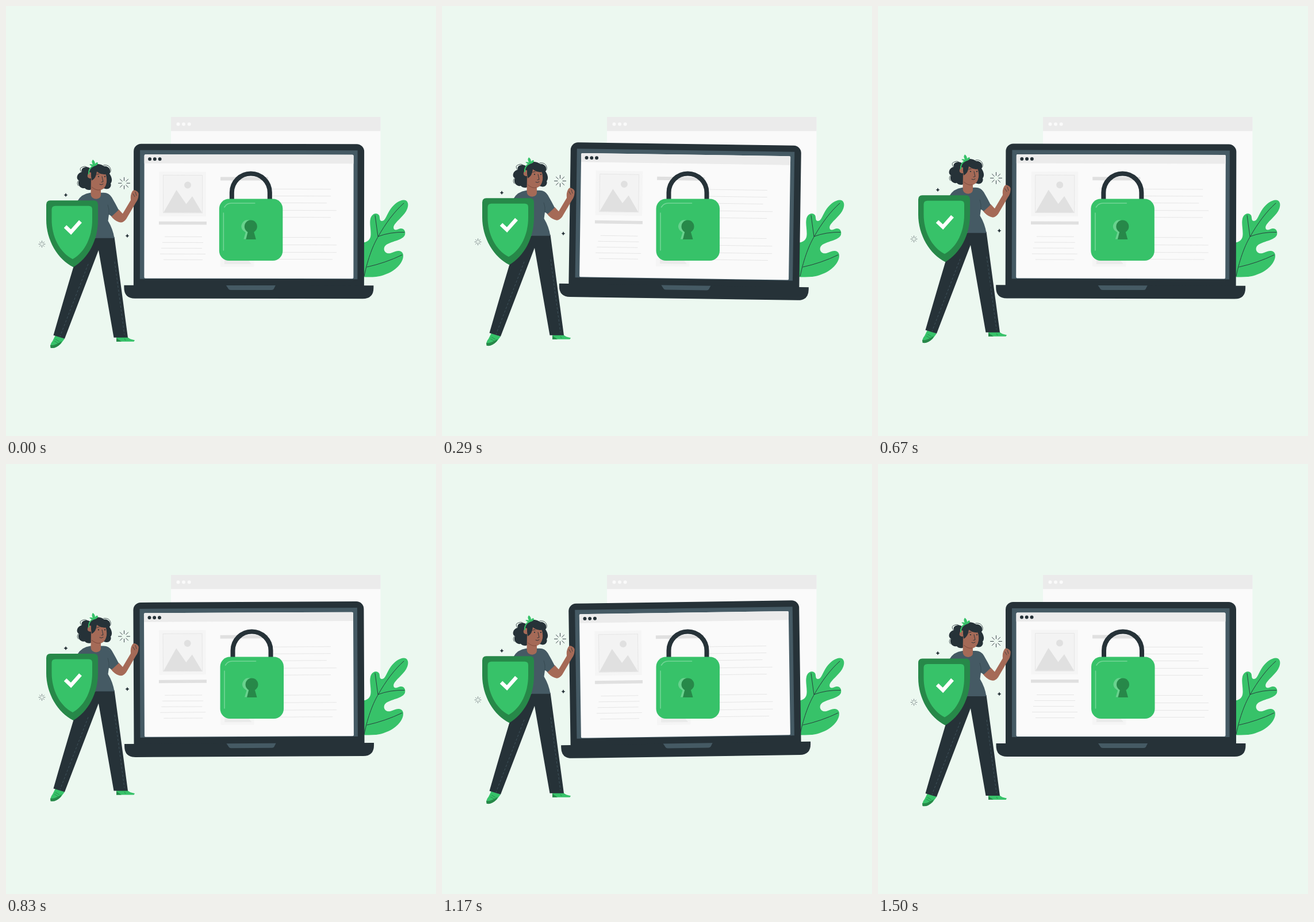
Write an HTML page that moves like this. It is 748 px wide and 748 px high and loops after 1.54 s.

```html
<!DOCTYPE html>
<html lang="en">
<head>
<meta charset="utf-8">
<title>Secure laptop</title>
<style>
  html, body { margin: 0; height: 100%; overflow: hidden; background: #ecf8f0; }
  svg { display: block; width: 100%; height: 100%; }
  .ink { fill: #263238; }
  .slate { fill: #455a64; }
  .green { fill: #37c269; }
  .deep { fill: #278849; }
  .skin { fill: #a56a57; }
  .paper { fill: #fafafa; }
  .mist { fill: #f5f5f5; }
  .pale { fill: #ebebeb; }
  .grey { fill: #e0e0e0; }
  .line { fill: none; stroke: #263238; stroke-linecap: round; }
  .rule { fill: none; stroke: #e6e6e6; stroke-width: 1; }
  .shine { fill: none; stroke: #73d596; stroke-width: 1.6; stroke-linecap: round; }
</style>
</head>
<body>
<svg viewBox="0 0 748 748">
  <g id="window">
    <path class="paper" d="M287 193H651.5V411H287z"/>
    <path class="pale" d="M287 193H651.5V217.5H287z"/>
    <g class="paper"><circle cx="299.5" cy="205.5" r="3"/><circle cx="309" cy="205.5" r="3"/><circle cx="318.7" cy="205.5" r="3"/></g>
  </g>

  <g id="leaf">
    <path class="green" d="M618 471V412C629 411 634 407 634.500 398C635 388 632 378 634 370C636 361 645 358 649 364C651 368 649 374 654 374C660 374 662 363 669 353C677 342 689 335 696 338.500C701 342 700 350 696 357C690 367 677 376 674.500 383C673 389 677 391 683 388C690 385 696 390 694 398C691 407 672 409 662 415C656 419 656 427 663 430C670 432 676 425 684 426C692 427 693 436 688 445C680 460 660 469 644 471Q632 472 618 471z"/>
    <path class="line" stroke-width=".9" d="M623 470C630 437 639 415 648 400C660 379 675 358 692 343M642 364L647 401Q668 393 693 393.500M628 454Q660 447 689 433"/>
  </g>

  <g id="laptop">
    <rect class="ink" x="222" y="240" width="401" height="260" rx="13"/>
    <path class="slate" d="M233 251H611.500V475H233z"/>
    <rect class="paper" x="240.500" y="258.500" width="364" height="215.500" rx="2"/>
    <path class="pale" d="M240.500 274V260.500q0-2 2-2H602.500q2 0 2 2V274z"/>
    <g class="ink"><circle cx="250" cy="266.500" r="3"/><circle cx="258.700" cy="266.500" r="3"/><circle cx="267.500" cy="266.500" r="3"/></g>
    <path class="ink" d="M205.500 486H639.500V490q0 19-19 19H224.500q-19 0-19-19z"/>
    <path class="slate" d="M383 486H469L466 492q-1 2-4 2H391q-3 0-4-2z"/>

    <path class="mist" d="M266.500 288.500H348V366H266.500zM373 440H431.500V453.500H373z"/>
    <path d="M273.500 294.500H341.500V360H273.500z" fill="#f3f3f3" stroke="#e6e6e6"/>
    <path class="grey" d="M274 359.500L296.500 320 313.500 344.500 324 331 341 359.500zM266 375H349V380.500H266zM373 297.500H456V303.500H373z"/>
    <circle class="grey" cx="316" cy="311.500" r="6"/>
    <path class="pale" d="M380 440H420L427 449H380z"/>
    <path class="rule" d="M276 401.500H341M272 411.500H343M270 421.500H341M268 431.500H347M274 441.500H342M460 318.500H565M460 330.500H565M460 342.500H558M460 355.500H575M460 367.500H565M460 402.500H565M460 415.500H575M460 428.500H575M460 440.500H568"/>
  </g>

  <g id="lock">
    <path class="line" stroke-width="8" d="M393 338V324.500a33 33 0 0 1 66 0V338"/>
    <rect class="green" x="371" y="335.500" width="110.500" height="107.500" rx="17"/>
    <path class="shine" d="M378.500 425V360M380 350Q384 343 392 343H433"/>
    <path d="M412 390a11 11 0 0 1 11-17.500V405.500H413.500L417 394z" fill="#69d28e"/>
    <circle class="deep" cx="426" cy="383.500" r="11"/>
    <path class="deep" d="M421.500 390H430.500L435 406H417.500z"/>
  </g>

  <g id="person">
    <path class="skin" d="M182 365L196 354 203 361.500 217 338Q216 329 219.500 323Q222 319 226 321.500Q232 324 230.500 330Q230 337 226 342L209 371Q203 379 196 376Q189 374 182 365z"/>
    <path class="line" stroke="#7f4c3e" stroke-width=".7" d="M221 327l3 5m1-8l2 6"/>
    <path class="green" d="M86 573L102 579 96 587Q87 596 78 594.500Q76 589 81 583zM192 576H211Q215 580 224 581.500L222.500 584H192z"/>
    <path class="deep" d="M77 590Q84 592 97 583L95 588Q86 597 77.500 595zM192 578L201 584H192z"/>
    <path d="M84 583l7 4m-5-7l7 4m113-5l2 3" stroke="#278849" fill="none" stroke-width=".9"/>
    <path class="ink" d="M158 402H188.500L212 577H187.500L161 425 102 579 82.500 573Q100 512 118 452L132 420z"/>
    <path d="M143 449L94 575M189 445L206 572" fill="none" stroke="#455a64" stroke-width=".8" stroke-dasharray="4 3"/>
    <path class="slate" d="M124 340Q131 327 147 325H170Q179 325 184 333Q191 345 196 355L184 366 179 363 177.500 374Q186 388 188.500 404H150z"/>
    <path d="M179 363Q180 354 177 346" fill="none" stroke="#34474f" stroke-width=".8"/>

    <path class="ink" d="M147 283C140 277 129 282 132 289C123 291 121 301 127 304C123 311 130 319 137 317C142 323 152 320 155 314L172 318C181 321 184 312 182 309C187 303 182 295 180 292C184 285 178 278 171 279C163 273 151 274 147 283z"/>
    <path class="line" stroke-width=".8" d="M132 290q-7-8 2-10q5-2 8 2M170 277q10-1 12 7q1 5-2 7M126 304q-4 5 0 9"/>
    <path class="skin" d="M148 300Q140 300 142 294Q144 289 149 292L155 287Q162 291 172 289Q176 297 175 307Q173 318 165 320.500V327Q166 335 157 336Q147 335 147.500 326z"/>
    <path class="ink" d="M148 296Q145 283 157 280Q174 278 174 292Q166 295 158 288Q157 300 149 304z"/>
    <path class="skin" d="M148 290Q142 288 142.500 295Q143 301 148 300z"/>
    <path d="M149 315Q157 322 164 320" stroke="#7f4c3e" fill="none"/>
    <path class="line" stroke-width=".9" d="M158 293.500q2-2 4-1m7.500 0l4 .5M167 297l2 9-3 .5m-3 4q3 2 6-.5"/>
    <g class="ink"><circle cx="161" cy="297" r="1.100"/><circle cx="172" cy="297" r="1.100"/></g>
    <path d="M144 293Q143 282 153 278" fill="none" stroke="#37c269" stroke-width="2"/>
    <path class="green" d="M153 279Q147 272 151 267.500Q155 270 155 275Q157 271 160 273Q160 277 155 278.500zM149 279l-4-3q4-2 9 2z"/>

    <path class="deep" d="M77 338.500H153Q160 338.500 160 346V372C160 408 143 439 117 454.500C90 441 70 408 70 372V346Q70 338.500 77 338.500z"/>
    <path class="green" d="M86 348H144Q150 348 150 354V372C150 401 138 428 116 440.500C93 429 79.500 401 79.500 372V354Q79.500 348 86 348z"/>
    <path d="M103 384L113 393.500 129.500 375" fill="none" stroke="#fff" stroke-width="6.500"/>
    <g id="sparks"></g>
  </g>
</svg>
<script>
const byId = id => document.getElementById(id);

// Eight rays around a centre, between two radii.
function burst(x, y, inner, outer, width) {
  let d = '';
  for (let i = 0; i < 8; i++) {
    const c = Math.cos(i * Math.PI / 4), s = Math.sin(i * Math.PI / 4);
    d += `M${x + inner * c} ${y + inner * s}L${x + outer * c} ${y + outer * s}`;
  }
  return `<path class="line" stroke-width="${width}" d="${d}"/>`;
}

const star = (x, y, r) =>
  `<path class="ink" d="M${x} ${y - r}q.6 ${r - .6} ${r} ${r}q${.6 - r} .6 ${-r} ${r}q-.6 ${.6 - r} ${-r} ${-r}q${r - .6}-.6 ${r} ${-r}z"/>`;

byId('sparks').innerHTML =
  burst(205.5, 308.5, 4.5, 10, .9) + burst(62.5, 414.5, 2.5, 5.5, .6) +
  star(104, 329, 3.5) + star(211, 400, 3.5);

// Piecewise linear keyframes: [[position, value], ...]
function track(keys, p) {
  const i = Math.max(1, keys.findIndex(k => k[0] >= p));
  const [a, from] = keys[i - 1], [b, to] = keys[i];
  return from + (to - from) * (p - a) / (b - a);
}

const LOOP = 1540, STEP = 1000 / 24, STEPS = 36;
const float = [[0, 0], [.5, -10], [1, 0]];
const tilt = [[0, 0], [.25, 1], [.75, -1], [1, 0]];
const shake = [0, -1, 2, -4, 4, -4, 4, -4, 2, -1, 0].map((x, i) => [i / 10, x]);

function draw() {
  const time = performance.now() % LOOP;
  const p = Math.min(1, (Math.floor((time + 5) / STEP) + .5) / STEPS);
  byId('person').setAttribute('transform', `translate(0 ${track(float, p)})`);
  byId('laptop').setAttribute('transform', `rotate(${track(tilt, p)} 422.5 374.5)`);
  byId('lock').setAttribute('transform', `translate(${track(shake, p)} 0)`);
  requestAnimationFrame(draw);
}
draw();
</script>
</body>
</html>
```
